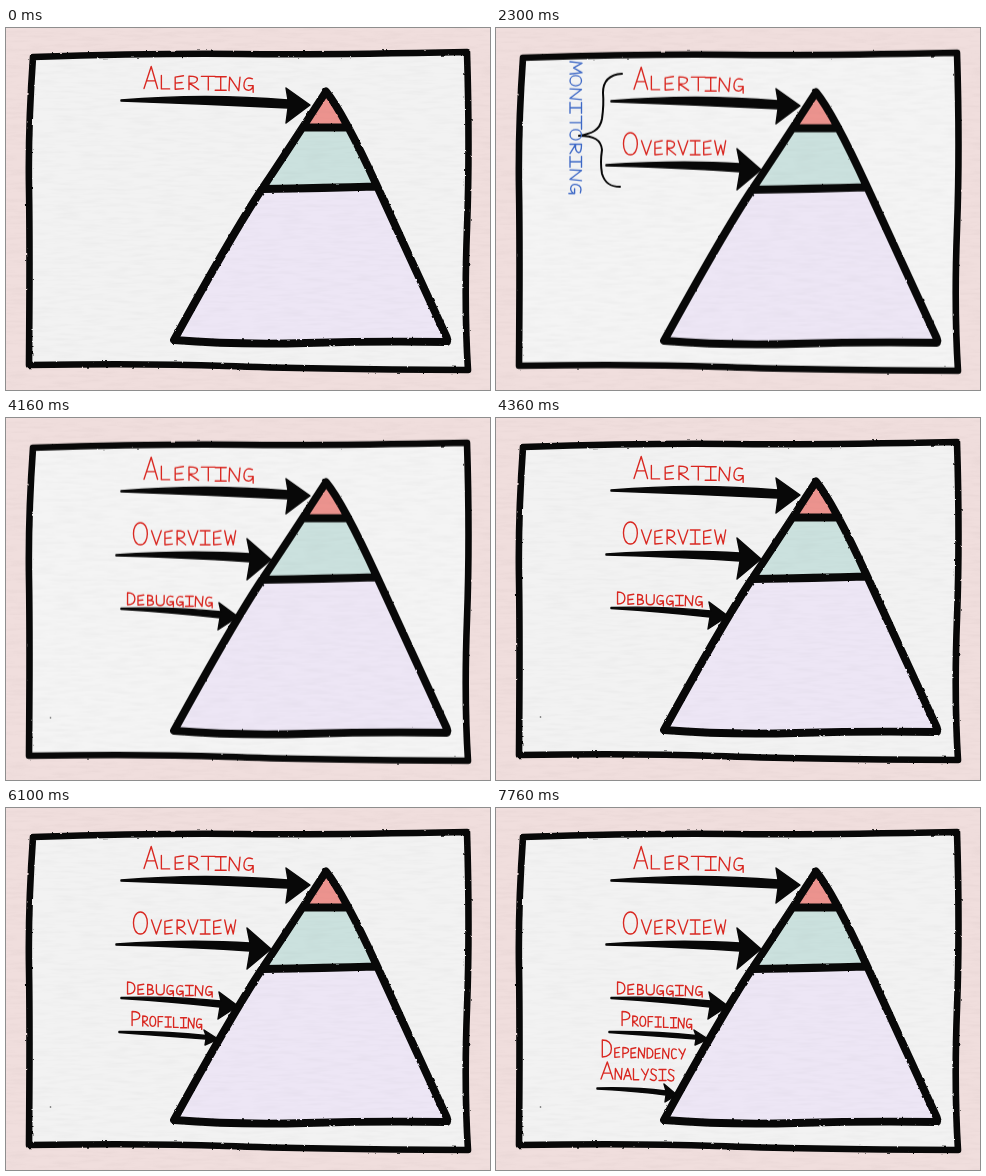
An HTML page that plays this animation: 484x362 px, repeating every 8 s.

```html
<!DOCTYPE html>
<html lang="en">
<head>
<meta charset="utf-8">
<title>Pyramid of uses</title>
<style>
html, body { margin: 0; width: 100%; height: 100%; overflow: hidden; background: #f0dedd; }
svg { display: block; width: 484px; height: 362px; }
.ink { fill: none; stroke: #080808; stroke-linecap: round; stroke-linejoin: round; }
.arrow { fill: #080808; stroke: #080808; stroke-width: 1.4; stroke-linejoin: round; }
.word path { fill: none; stroke: #d92720; stroke-width: 1.35; stroke-linecap: round;
  stroke-linejoin: round; vector-effect: non-scaling-stroke; }
.blue path { stroke: #3d68c6; }
.step, #art, #paper, .rough { animation: 8s step-end infinite; }
#art { animation-name: nudge; }
#paper { animation-name: tone; }
.rough { filter: url(#edgeA); animation-name: edge; }
.overview { animation-name: overview; }
#monitoring { animation-name: monitoring; }
#debugging { animation-name: debugging; }
#profiling { animation-name: profiling; }
#analysis { animation-name: analysis; }

/* each new label arrives on a briefly redrawn sheet */
@keyframes nudge {
  0%, 7.875%, 31.25%, 54.5%, 76.25%, 97% { transform: none; }
  6.25%, 28.75%, 52%, 73.75%, 94.5% { transform: translateY(.7px); }
}
@keyframes tone {
  0%, 7.875%, 31.25%, 54.5%, 76.25%, 97% { fill: #f2f2f2; }
  6.25%, 28.75%, 52%, 73.75%, 94.5% { fill: #f4f4f4; }
}
@keyframes edge {
  0%, 7.875%, 31.25%, 54.5%, 76.25%, 97% { filter: url(#edgeA); }
  6.25%, 28.75%, 52%, 73.75%, 94.5% { filter: url(#edgeB); }
}
@keyframes overview { 0% { visibility: hidden; } 6.25%, 100% { visibility: visible; } }
@keyframes monitoring {
  0%, 52% { visibility: hidden; }
  28.75% { visibility: visible; }
  100% { visibility: hidden; }
}
@keyframes debugging { 0% { visibility: hidden; } 52%, 100% { visibility: visible; } }
@keyframes profiling { 0% { visibility: hidden; } 73.75%, 100% { visibility: visible; } }
@keyframes analysis { 0% { visibility: hidden; } 94.5%, 100% { visibility: visible; } }
</style>
</head>
<body>
<svg viewBox="0 0 484 362">
  <defs>
    <filter id="edgeA" filterUnits="userSpaceOnUse" x="0" y="0" width="484" height="362" color-interpolation-filters="sRGB">
      <feTurbulence type="fractalNoise" baseFrequency=".2" numOctaves="2" seed="4"/>
      <feDisplacementMap in="SourceGraphic" scale="2.2" xChannelSelector="R" yChannelSelector="G"/>
    </filter>
    <filter id="edgeB" filterUnits="userSpaceOnUse" x="0" y="0" width="484" height="362" color-interpolation-filters="sRGB">
      <feTurbulence type="fractalNoise" baseFrequency=".2" numOctaves="2" seed="4"/>
      <feDisplacementMap in="SourceGraphic" scale="1.8" xChannelSelector="R" yChannelSelector="G"/>
    </filter>
    <filter id="grain" x="0" y="0" width="1" height="1" color-interpolation-filters="sRGB">
      <feTurbulence type="fractalNoise" baseFrequency=".04 .3" numOctaves="2" seed="9"/>
      <feColorMatrix values="0 0 0 0 .3  0 0 0 0 .3  0 0 0 0 .3  .07 0 0 0 -.028"/>
    </filter>
  </defs>

  <rect width="484" height="362" fill="#f0dedd"/>
  <g id="art">
    <path id="paper" fill="#f2f2f2" d="M27 28L460 24 462 341 23 337Z"/>
    <path fill="#ede6f5" d="M256 161L371 159 442 314 168 312Z"/>
    <path fill="#cbe1de" d="M295 99H343L371 159 256 161Z"/>
    <path fill="#ec938e" d="M320 63L343 99H295Z"/>
    <rect width="484" height="362" filter="url(#grain)"/>
    <g class="rough">
      <path class="ink" stroke-width="6.6" d="M27 29Q150 25 235 26T461 24Q464 120 461 200T462 342Q300 341 220 338T23 337Q24 220 23 160T27 29"/>
      <path class="ink" stroke-width="7.8" d="M320 63.5Q284 119 256 161T168 312Q230 317 300 315T441 314Q442 312 441 310 405 232 371 158T320 63.5M297 99.5L342 99.5M257 161Q320 160 370 158.5"/>
    </g>
    <path class="arrow" d="M115 72Q200 65 282 72L280 60 304 77 280 95 282 80Q200 76 115 73Z"/>
    <path class="arrow step overview" d="M110 136Q185 131 244 135L241 120 265 141 241 161 244 143Q185 139 110 137Z"/>
    <g class="word" id="alertingText"></g>
    <g class="word step overview" id="overviewText"></g>
    <g class="step" id="monitoring">
      <path class="ink" stroke-width="2" d="M126 45C112 46 107 54 107 64Q108 76 106 90C104 102 95 105 83 107C98 107 105 111 106 121Q104 134 106 145C109 155 115 158 124 158"/>
      <g class="word blue" transform="translate(74 33) rotate(90)"></g>
    </g>
    <g class="step" id="debugging">
      <path class="arrow" d="M115 189.5Q170 188 215 193L213 184 232 198 212 211 214 199Q170 194 115 190.5Z"/>
      <circle cx="44.5" cy="299" r=".8" fill="#555"/>
      <g class="word"></g>
    </g>
    <g class="step" id="profiling">
      <path class="arrow" d="M113 223.5Q160 223 200 227.5L198 222 212 231 199 237 200 231Q160 228 113 224.5Z"/>
      <g class="word"></g>
    </g>
    <g class="step" id="analysis">
      <path class="arrow" d="M101 280Q140 279 170 283L168 276 181 287 169 294 170 287Q140 283 101 281Z"/>
      <g class="word"></g>
    </g>
  </g>
</svg>
<script>
// pen strokes in a 10 by 10 cell
const glyphs = {
  A: "M0 10L4.5 0 8.5 10M1.5 6.5H7",
  B: "M1 0V10Q7 10 7 7.5T2 5Q6 5 6 2.5T1 0",
  C: "M7 1Q1 -2 1 5T7 9",
  D: "M1 0V10Q8 10 8 5T1 0",
  E: "M7 0L1 1V10L7 9.5M1 5.5L6 5",
  F: "M7 0H1V10M1 5H6",
  G: "M7 1Q2 -1 1 4T4 9.5Q7 9 7.5 6H4M7.5 6V11",
  I: "M0 0H8M4 0V10M0 10H8",
  L: "M1 0V10H7",
  M: "M0 10L1 0 4.5 7 8 0 9 10",
  N: "M0 10L.5 0 7 10 8 0",
  O: "M4 0C-1 0 -1 10 4 10S9 0 4 0",
  P: "M1 10V0Q8 0 8 3T1 6",
  R: "M1 10V0Q8 0 7 3T1 5L8 10",
  S: "M7 1Q1 -2 1 2Q1 4 4 5T7 8Q6 12 0 9",
  T: "M0 0H10M5 0V10",
  U: "M0 0V6Q0 10 4 10T8 6V0",
  V: "M0 0L4 10 8 0",
  W: "M0 0L2.5 10 5 3 7 10 9 0",
  Y: "M0 0L4 5M8 0L3 10"
};

// cap and small are [advance, height]
function write(parent, text, x, base, cap, small, slope = 0) {
  const group = document.querySelector(parent);
  const word = document.createElementNS("http://www.w3.org/2000/svg", "g");
  word.setAttribute("role", "img");
  word.setAttribute("aria-label", text);
  group.append(word);
  [...text].forEach((letter, i) => {
    const [step, height] = i ? small : cap;
    const path = document.createElementNS("http://www.w3.org/2000/svg", "path");
    path.setAttribute("d", glyphs[letter]);
    path.setAttribute("transform",
      `translate(${x} ${base - height}) scale(${step / 10} ${height / 10})`);
    word.append(path);
    x += step;
    base += step * slope;
  });
}

write("#alertingText", "ALERTING", 138, 60.5, [16, 22], [13.8, 13.5], .025);
write("#overviewText", "OVERVIEW", 127, 126, [18.5, 22], [12.2, 14]);
write("#monitoring .word", "MONITORING", 0, 0, [13.6, 12], [13.5, 11.5]);
write("#debugging .word", "DEBUGGING", 120.5, 186, [10.5, 12], [9.7, 10], .025);
write("#profiling .word", "PROFILING", 125, 217.5, [11, 14], [7.7, 10], .045);
write("#analysis .word", "DEPENDENCY", 105, 249, [13, 17], [8.1, 10], .025);
write("#analysis .word", "ANALYSIS", 105, 271, [14, 17], [8.8, 11], .025);
</script>
</body>
</html>
```
